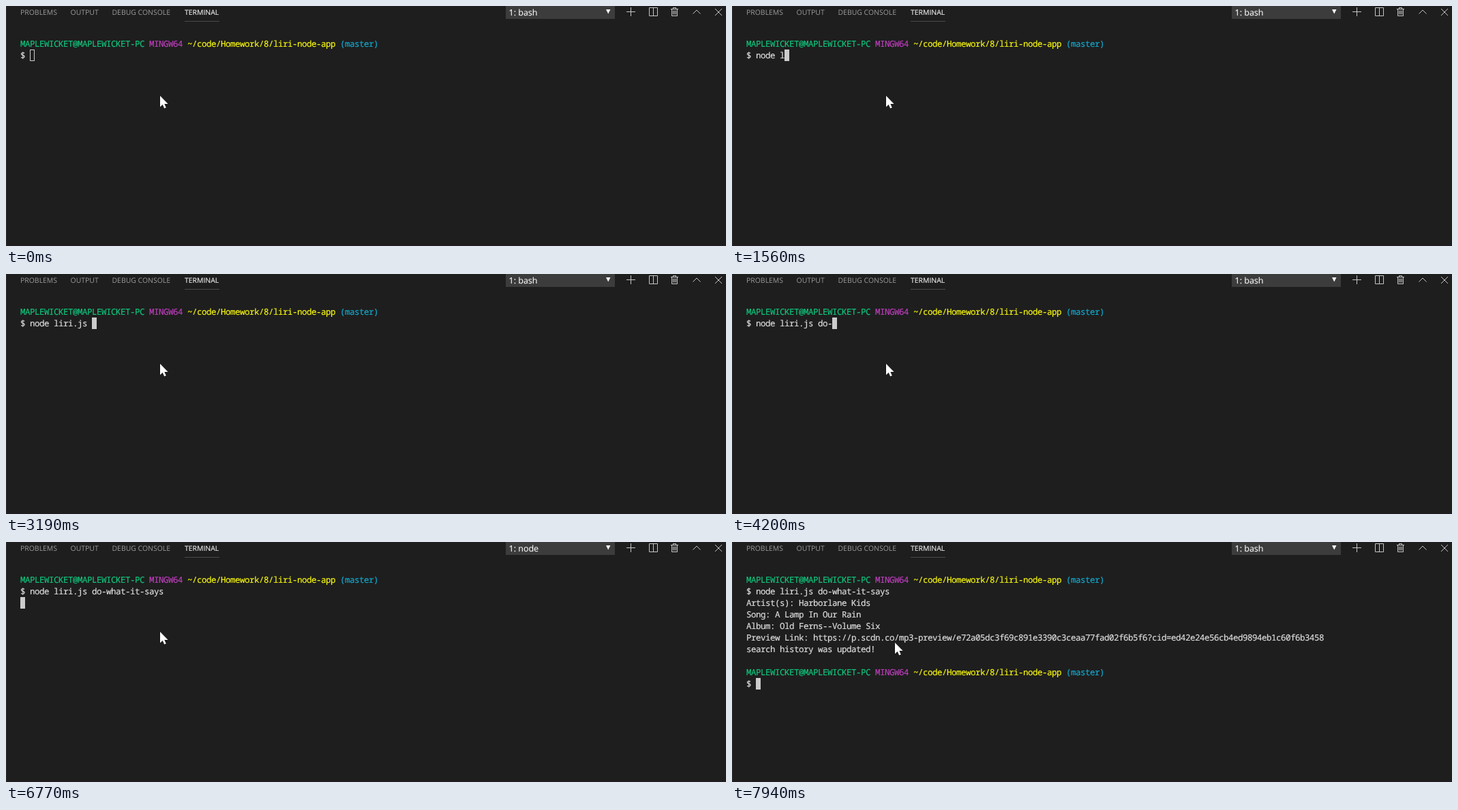
Write an HTML page that moves like this. It is 1056 px wide and 353 px high and loops after 8000 ms.

```html
<!DOCTYPE html>
<html lang="en">
<head>
<meta charset="utf-8">
<title>Terminal</title>
<style>
  html, body { margin: 0; width: 100%; height: 100%; overflow: hidden; background: #1e1e1e; }
  svg { display: block; width: 1056px; height: 353px; }
  text { white-space: pre; text-rendering: geometricPrecision; }
  .tabs { font: 10.45px "Open Sans", sans-serif; fill: #9c9c9c; }
  .tabs .on { fill: #f0f0f0; stroke: #f0f0f0; stroke-width: .15px; }
  .shell { font: 12.5px "Open Sans", sans-serif; fill: #f8f8f8; stroke: #f8f8f8; stroke-width: .15px; }
  .icons { fill: none; stroke: #c5c5c5; }
  #term { font: 12.5px "Noto Sans Mono", monospace; letter-spacing: -.5px; stroke-width: .2px; }
  .plain { fill: #dcdcdc; stroke: #dcdcdc; }
  .user { fill: #10c47c; stroke: #10c47c; }
  .sys { fill: #bc3fbc; stroke: #bc3fbc; }
  .path { fill: #f5f510; stroke: #f5f510; }
  .branch { fill: #11a8cd; stroke: #11a8cd; }
</style>
</head>
<body>
<svg viewBox="0 0 1056 353">
  <rect width="1056" height="353" fill="#1e1e1e"/>
  <rect width="1" height="353" fill="#2b2b2b"/>
  <rect y="352" width="1056" height="1" fill="#231c26"/>

  <g class="tabs">
    <text x="21" y="13">PROBLEMS</text>
    <text x="94.5" y="13">OUTPUT</text>
    <text x="155.5" y="13">DEBUG CONSOLE</text>
    <text x="262" y="13" class="on">TERMINAL</text>
  </g>
  <rect x="262" y="22" width="51" height="1" fill="#4a4a4a"/>

  <rect x="733" width="160" height="19" fill="#3c3c3c"/>
  <text id="shell" class="shell" x="737.5" y="14"></text>
  <path d="M880 5h6.5l-3.25 6.5z" fill="#f8f8f8"/>

  <g class="icons">
    <path d="M910 8.5h13M916.5 2v13"/>
    <path d="M943.5 2.5h12v12h-12zM949.5 2.5v12"/>
    <path d="M975 4.5h11M978.5 4v-1.500h4v1.500M976.5 5v9.5h8v-9.5M978.5 6.5v6M980.5 6.5v6M982.5 6.5v6"/>
    <path d="M1007.5 11.5l5.5-5.5 5.5 5.5"/>
    <path d="M1040 4l10 10M1050 4l-10 10"/>
  </g>

  <g id="term"></g>
  <rect id="caret" width="6" height="16" stroke="#cccccc"/>
  <circle id="click" cx="225.5" cy="131.5" r="11.5" fill="#ff0" fill-opacity=".47"/>
  <path id="mouse" d="M0 0v16.5l3.7-3.5 2.4 5.5 2.7-1.1-2.4-5.4h5.2z" fill="#fff" stroke="#111" paint-order="stroke"/>
</svg>
<script>
const LOOP = 8000, LEFT = 21, TOP = 47, CELL = 7, LINE = 17;
const $ = id => document.getElementById(id);
const span = (cls, s) => `<tspan class="${cls}">${s}</tspan>`;

const command = "node liri.js do-what-it-says";
const prompt = [
  span("user", "MAPLEWICKET@MAPLEWICKET-PC"),
  span("sys", "MINGW64"),
  span("path", "~/code/Homework/8/liri-node-app"),
  span("branch", "(master)")
].join(" ");
const output = [
  "Artist(s): Harborlane Kids",
  "Song: A Lamp In Our Rain",
  "Album: Old Ferns--Volume Six",
  "Preview Link: https://p.scdn.co/mp3-preview/e72a05dc3f69c891e3390c3ceaa77fad02f6b5f6?cid=ed42e24e56cb4ed9894eb1c60f6b3458",
  "search history was updated!"
];

// Bursts of keys: [first key time, key count], 80 ms apart.
const bursts = [
  [1010, 3], [1400, 6], [2340, 1], [2650, 1], [2800, 1], [3190, 1], [3890, 1],
  [4050, 1], [4200, 1], [4360, 2], [4590, 3], [5450, 3], [5760, 4]
];
const keys = bursts.flatMap(([t, n]) => Array.from({ length: n }, (_, i) => t + 80 * i));
const FOCUS = 150, ENTER = 6690, RUN = 6770, PRINT = 7700, SAVED = 7780, DONE = 7860, EXIT = 7940;
const mousePath = [[0, 226, 132], [SAVED, 229, 136], [DONE, 235, 143], [EXIT, 239, 148]];

let shown = "";

function draw(t) {
  const typed = command.slice(0, keys.filter(k => k <= t).length);
  const rows = [prompt, "$ " + typed];
  let col = 2 + typed.length;
  if (t >= ENTER) col = 0;
  if (t >= PRINT) rows.push(...output.slice(0, t >= SAVED ? 5 : 4));
  if (t >= DONE) {
    rows.push("", prompt, "$ ");
    col = 2;
  }
  const row = t >= ENTER && t < DONE ? rows.length : rows.length - 1;

  const html = rows.map((s, i) =>
    `<text class="plain" x="${LEFT}" y="${TOP + 13 + i * LINE}">${s}</text>`).join("");
  if (html !== shown) $("term").innerHTML = shown = html;

  const caret = $("caret");
  caret.setAttribute("x", LEFT + col * CELL + .5);
  caret.setAttribute("y", TOP + row * LINE + .5);
  caret.setAttribute("fill", t < FOCUS ? "none" : "#cccccc");

  $("shell").textContent = t >= RUN && t < EXIT ? "1: node" : "1: bash";
  $("click").style.display = t >= 70 && t < 230 ? "" : "none";
  const [, x, y] = mousePath.filter(p => p[0] <= t).pop();
  $("mouse").setAttribute("transform", `translate(${x} ${y})`);
}

const start = performance.now();
function tick() {
  draw((performance.now() - start) % LOOP);
  requestAnimationFrame(tick);
}
tick();
</script>
</body>
</html>
```
